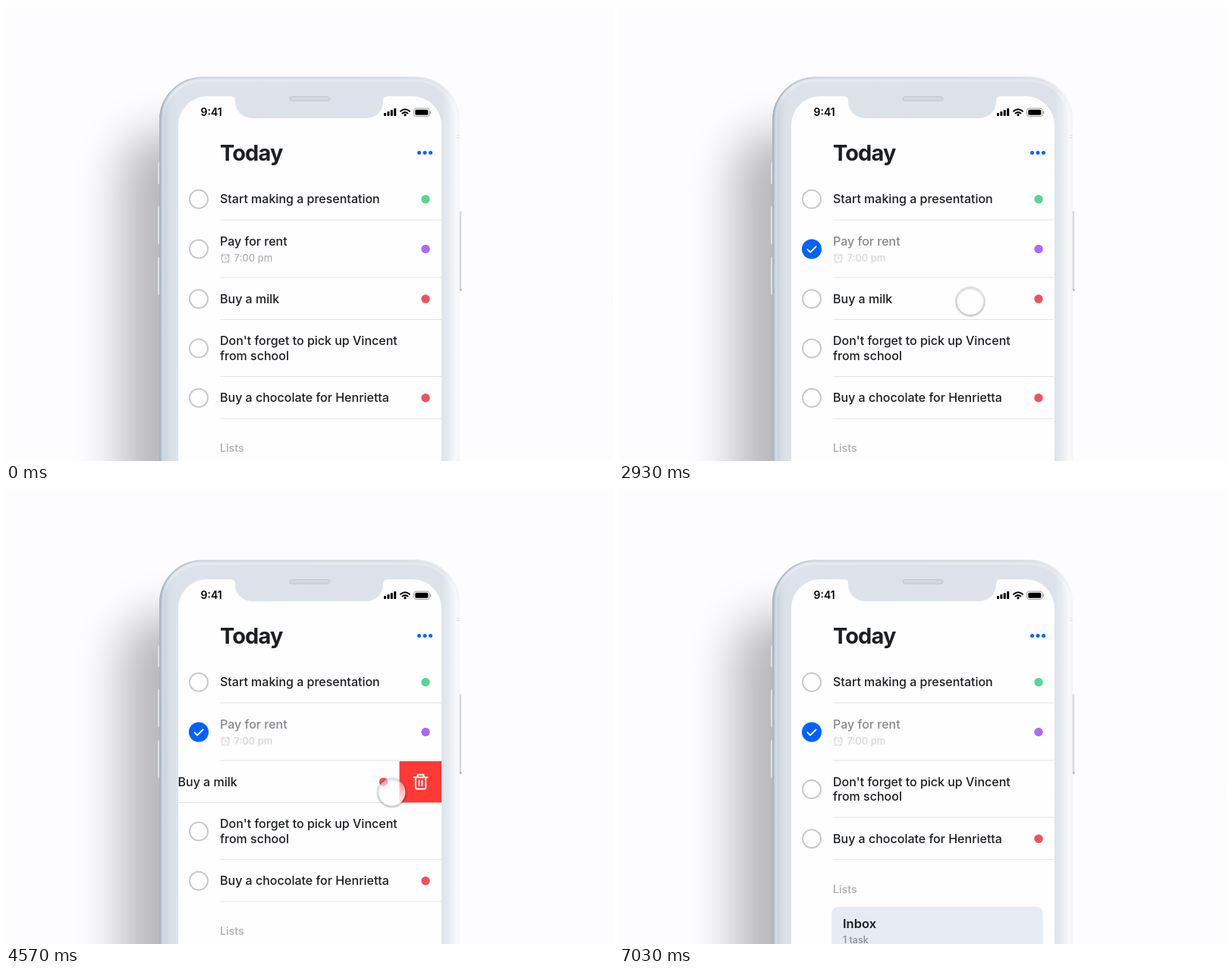
Recreate the animation shown at these times as an HTML page. Size 800 px wide and 600 px high, loop 7060 ms.

```html
<!DOCTYPE html>
<html lang="en">
<head>
<meta charset="utf-8">
<title>Swipe to delete</title>
<style>
html, body { margin: 0; height: 100%; overflow: hidden; background: #fdfcfe; }
svg { display: block; width: 100vw; height: 100vh; }
text { font-family: Inter, Roboto, sans-serif; font-size: 16px; font-weight: 500; fill: #1b1e25; }
.small { font-size: 13px; fill: #b3b3b8; }
.ring { fill: none; stroke: #c8c8cc; stroke-width: 2; }
.line { stroke: #e3e3e6; }
.icon { fill: none; stroke-linecap: round; stroke-linejoin: round; }
</style>
</head>
<body>
<svg viewBox="0 0 800 600">
  <defs>
    <linearGradient id="body">
      <stop offset="0" stop-color="#aeb9c5"/>
      <stop offset=".012" stop-color="#c6cfd9"/>
      <stop offset=".035" stop-color="#d8dfe7"/>
      <stop offset=".06" stop-color="#dde3eb"/>
      <stop offset=".94" stop-color="#dde2ea"/>
      <stop offset=".965" stop-color="#e9edf2"/>
      <stop offset=".985" stop-color="#f5f6f9"/>
      <stop offset="1" stop-color="#f9f9fb"/>
    </linearGradient>
    <linearGradient id="rim">
      <stop offset="0" stop-color="#a9b5c2"/>
      <stop offset=".15" stop-color="#cdd5de"/>
      <stop offset=".8" stop-color="#d3dae2"/>
      <stop offset="1" stop-color="#f4f5f8"/>
    </linearGradient>
    <linearGradient id="glass" x2="0" y2="1">
      <stop offset="0" stop-color="#fff" stop-opacity=".45"/>
      <stop offset="1" stop-color="#fff" stop-opacity=".96"/>
    </linearGradient>
    <filter id="haze" x="-60%" y="-40%" width="220%" height="180%"><feGaussianBlur stdDeviation="31"/></filter>
    <filter id="soft" x="-30%" y="-30%" width="160%" height="160%"><feGaussianBlur stdDeviation="1.1"/></filter>
    <clipPath id="screen"><path id="screenShape" d="M227 610V157a38 38 0 0 1 38-38H296q6 0 6 6v1a22 22 0 0 0 22 22H475a22 22 0 0 0 22-22v-1q0-6 6-6H536a38 38 0 0 1 38 38V610z"/></clipPath>
    <clipPath id="slot"><rect id="slotBox" x="227" y="358.5" width="347" height="56"/></clipPath>
  </defs>

  <rect width="800" height="600" fill="#fdfcfe"/>
  <rect x="153" y="168" width="320" height="620" rx="50" fill="#000" opacity=".27" filter="url(#haze)"/>

  <g fill="#dfe4ea" stroke="#bcc5cf" stroke-width=".6">
    <rect x="200" y="206" width="4" height="29" rx="1.5"/>
    <rect x="200" y="264" width="4" height="50" rx="1.5"/>
    <rect x="200" y="331" width="4" height="50" rx="1.5"/>
  </g>
  <rect x="596" y="270" width="4.5" height="106" rx="1.5" fill="#e4e6ea"/>
  <path d="M598.5 271V375" stroke="#c9ccd2"/>
  <path d="M598 374.5h2.5" stroke="#a9adb4" stroke-width="2"/>
  <rect x="202" y="93.5" width="396" height="600" rx="57" fill="url(#body)"/>
  <rect x="203" y="94.5" width="394" height="600" rx="56" fill="none" stroke="url(#rim)" stroke-width="2"/>
  <rect x="207" y="98.5" width="386" height="600" rx="52" fill="none" stroke="#fff" stroke-opacity=".22" stroke-width="3"/>
  <path d="M594 170.500h4M594 173.500h4" stroke="#d9dce2" stroke-width=".7"/>
  <use href="#screenShape" fill="#fefdff"/>
  <rect x="374" y="119.500" width="53" height="5.500" rx="2.750" fill="#d3d8e0" stroke="#bfc5ce"/>

  <text x="256.500" y="145" style="font-size:14px;font-weight:600;fill:#000">9:41</text>
  <g id="signal"></g>
  <path class="icon" stroke="#000" stroke-width="2" d="M520 138.700q6-5 12 0M522.500 141.500q3.500-2.700 7 0"/>
  <circle cx="526" cy="143.700" r="1.600"/>
  <rect x="537.500" y="135" width="20.500" height="10.500" rx="3" fill="none" stroke="#9b9b9f"/>
  <rect x="539.300" y="136.800" width="17" height="7" rx="1.600"/>
  <path d="M559.500 138.500v3.500" stroke="#9b9b9f" stroke-width="1.300"/>

  <g clip-path="url(#screen)">
    <text x="282" y="204" style="font-size:29px;font-weight:700;letter-spacing:-.9px">Today</text>
    <g fill="#0a62ff"><circle cx="544.500" cy="193.500" r="2.500"/><circle cx="552" cy="193.500" r="2.500"/><circle cx="559.500" cy="193.500" r="2.500"/></g>

    <g id="above"></g>
    <g id="paid">
      <text x="282" y="316">Pay for rent</text>
      <text x="300.500" y="337" class="small">7:00 pm</text>
      <path class="icon" stroke="#b3b3b8" stroke-width="1.100" d="M284 333a5 5 0 1 0 10 0a5 5 0 1 0-10 0M289 330v3h2.500M283.500 329.500l2.500-2.500M294.500 329.500l-2.500-2.500M285.500 337l-1 1.200M292.500 337l1 1.200"/>
    </g>
    <g transform="translate(254 320.500)">
      <circle id="fill" r="13" fill="#0061ff"/>
      <path id="tick" class="icon" stroke="#fff" stroke-width="1.900" pathLength="1" stroke-dasharray="1 2" d="M-5.500 .6l3.700 3.600 7.300-7.400"/>
    </g>

    <g clip-path="url(#slot)">
      <g id="swipe">
        <g id="milk"></g>
        <rect x="574" y="359" width="360" height="54.500" fill="#fe3936"/>
        <path class="icon" stroke="#fff" stroke-width="1.900" transform="translate(602 386)" d="M-9-5.800H9M-4-6V-9.300H4V-6M-6.700-5.500V7.500a2 2 0 0 0 2 2H4.700a2 2 0 0 0 2-2V-5.500M-2-1.500V5M2-1.500V5"/>
      </g>
    </g>

    <g id="below">
      <g id="rest"></g>
      <text x="282" y="588" style="font-size:14px;font-weight:600;fill:#b4b4b9">Lists</text>
      <rect x="280.500" y="606.500" width="278" height="80" rx="8" fill="#e6eaf2"/>
      <text x="295" y="634" style="font-weight:600;font-size:16.500px">Inbox</text>
      <text x="295" y="654.500" class="small" style="font-size:12.500px;fill:#8b8e96">1 task</text>
    </g>
  </g>

  <g id="cursor">
    <circle cy="1" r="18" fill="none" stroke="#000" stroke-opacity=".38" stroke-width="1.800" filter="url(#soft)"/>
    <circle r="18" fill="url(#glass)"/>
  </g>
</svg>
<script>
const LOOP = 7060, OPEN = 55.5, WIDTH = 347;
const el = id => document.getElementById(id);
const RED = '#f0515e';

function taskRow(y, lines, dot, lineY) {
  const first = y + 5.5 - (lines.length - 1) * 10;
  return `<circle class="ring" cx="254" cy="${y}" r="12"/>` +
    lines.map((s, i) => `<text x="282" y="${first + i * 19.7}">${s}</text>`).join('') +
    (dot ? `<circle cx="553" cy="${y}" r="5.700" fill="${dot}"/>` : '') +
    `<path class="line" d="M282 ${lineY}H574"/>`;
}

el('above').innerHTML = taskRow(254.8, ['Start making a presentation'], '#56d795', 282) +
  taskRow(320.5, [], '#a86bfd', 358);
el('milk').innerHTML = taskRow(386.2, ['Buy a milk'], RED, 413.5);
el('rest').innerHTML = taskRow(451.5, ["Don't forget to pick up Vincent", 'from school'], '', 488.5) +
  taskRow(516.7, ['Buy a chocolate for Henrietta'], RED, 544);
el('signal').innerHTML = [4, 6, 8, 10].map((h, i) =>
  `<rect x="${498 + i * 4.4}" y="${145 - h}" width="3" height="${h}" rx=".8"/>`).join('');

const outPow = n => u => 1 - (1 - u) ** n;
const inQuad = u => u * u;
const inOut = u => u < .5 ? 2 * u * u : 1 - 2 * (1 - u) ** 2;
const phase = (t, a, b, ease = u => u) => ease(Math.min(1, Math.max(0, (t - a) / (b - a))));
const pulse = (t, a, b) => Math.sin(Math.PI * phase(t, a, b));

// start, end, x, y, easing, sag of the path
const moves = [
  [30, 1270, 353, 332, outPow(1.8), 0],
  [1900, 2850, 463, 389, inOut, 0],
  [3100, 3650, 317, 393, inOut, 0],
  [4000, 4800, 546, 391, inOut, 17],
  [5300, 6530, 820, 400, inQuad, 0]
];

function cursorAt(t) {
  let x = 820, y = 385;
  for (const [a, b, toX, toY, ease, sag] of moves) {
    const u = phase(t, a, b, ease);
    x += (toX - x) * u;
    y += (toY - y) * u + sag * Math.sin(Math.PI * u);
  }
  return [x, y];
}

function rowShift(t, gone) {
  const drag = 146 * phase(t, 3100, 3650, inOut);
  const pulled = drag < OPEN ? drag : OPEN + (drag - OPEN) * .39;
  const settled = pulled + (OPEN - pulled) * phase(t, 3690, 4080, inOut);
  const open = t < 3690 ? pulled : settled;
  return open + (WIDTH - open) * gone;
}

function draw(t) {
  const done = phase(t, 1500, 1780, outPow(2));
  el('fill').setAttribute('transform', `scale(${done})`);
  el('tick').setAttribute('stroke-dashoffset', 1 - phase(t, 1640, 1900, inOut));
  el('tick').setAttribute('opacity', t > 1640 ? 1 : 0);
  el('paid').setAttribute('opacity', 1 - .48 * done);

  const gone = phase(t, 4830, 5230, outPow(1.75));
  el('swipe').setAttribute('transform', `translate(${-rowShift(t, gone)} 0)`);
  el('slotBox').setAttribute('height', 56 * (1 - gone ** 2.2));
  el('below').setAttribute('transform', `translate(0 ${-55.5 * gone})`);

  const [x, y] = cursorAt(t);
  const held = phase(t, 2980, 3080) - phase(t, 3660, 3780);
  const size = 1 - .13 * (pulse(t, 1380, 1640) + pulse(t, 4780, 5080)) - .03 * held;
  el('cursor').setAttribute('transform', `translate(${x} ${y}) scale(${size})`);
}

function tick() {
  draw(performance.now() % LOOP);
  requestAnimationFrame(tick);
}
tick();
</script>
</body>
</html>
```
